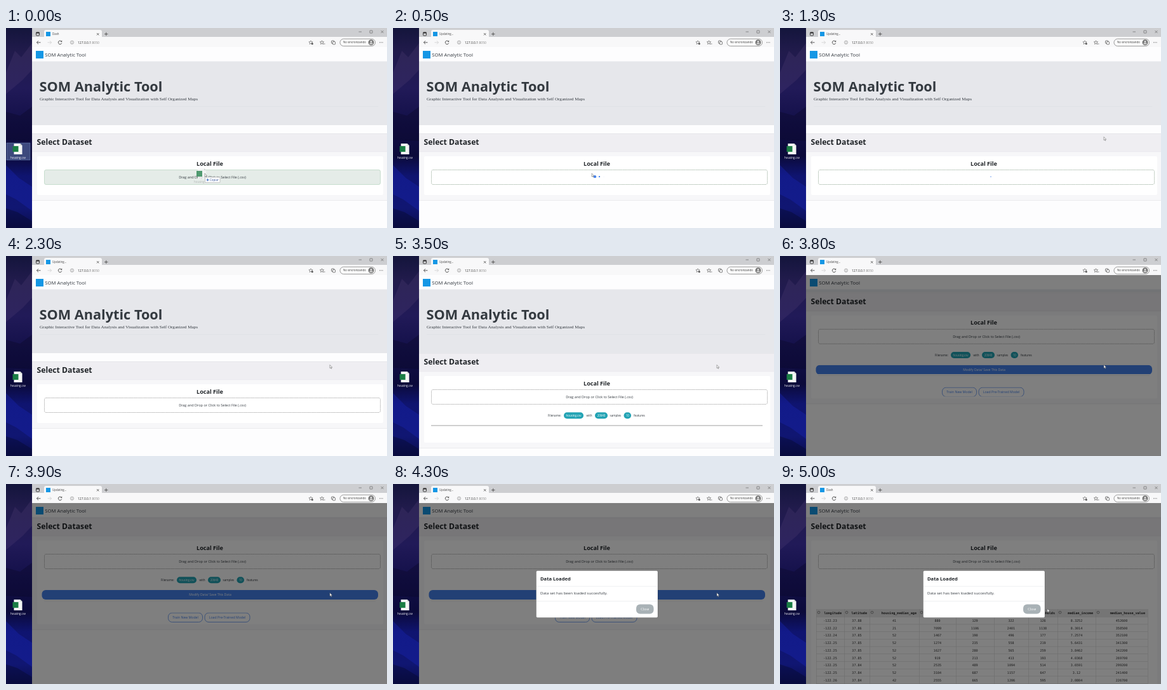
Recreate the animation shown at these times as an HTML page with a canvas. Size 600 by 315 pixels, loop 5.1 s.

```html
<!DOCTYPE html>
<html lang="en">
<head>
<meta charset="utf-8">
<title>SOM Analytic Tool</title>
<style>
html, body { margin: 0; width: 100%; height: 100%; overflow: hidden; background: #fff; }
canvas { display: block; width: 600px; height: 315px; }
</style>
</head>
<body>
<canvas id="stage"></canvas>
<script>
const W = 600, H = 315, LOOP = 5100, STEP = 100;
const SANS = '"Open Sans", "Noto Sans", sans-serif';
const SERIF = '"Liberation Serif", serif';
const MONO = '"DejaVu Sans Mono", monospace';
const INK = '#343a40', PRIMARY = '#4582ec', INFO = '#22a3b4', LOGO = '#1597e5';

const canvas = document.getElementById('stage');
const scale = window.devicePixelRatio || 1;
canvas.width = W * scale;
canvas.height = H * scale;
const ctx = canvas.getContext('2d');

const clamp = v => Math.min(1, Math.max(0, v));
const lerp = (a, b, p) => a + (b - a) * p;

function bezier(x1, y1, x2, y2) {
  const at = (a, b, s) => 3 * a * s * (1 - s) ** 2 + 3 * b * s * s * (1 - s) + s ** 3;
  return x => {
    let lo = 0, hi = 1;
    for (let i = 0; i < 24; i++) {
      const mid = (lo + hi) / 2;
      if (at(x1, x2, mid) < x) lo = mid; else hi = mid;
    }
    return at(y1, y2, (lo + hi) / 2);
  };
}
const ease = bezier(.25, .1, .25, 1);
const easeOut = bezier(0, 0, .58, 1);
const easeInOut = bezier(.42, 0, .58, 1);
const progress = (t, start, length, curve = ease) => {
  const p = clamp((t - start) / length);
  return p === 0 || p === 1 ? p : curve(p);
};

function rect(x, y, w, h, fill) {
  ctx.fillStyle = fill;
  ctx.fillRect(x, y, w, h);
}

function box(x, y, w, h, r, fill, stroke, width = .7) {
  ctx.beginPath();
  ctx.roundRect(x, y, w, h, r);
  if (fill) { ctx.fillStyle = fill; ctx.fill(); }
  if (stroke) { ctx.strokeStyle = stroke; ctx.lineWidth = width; ctx.stroke(); }
}

function disc(x, y, r, fill, stroke, width = .8) {
  ctx.beginPath();
  ctx.arc(x, y, r, 0, Math.PI * 2);
  if (fill) { ctx.fillStyle = fill; ctx.fill(); }
  if (stroke) { ctx.strokeStyle = stroke; ctx.lineWidth = width; ctx.stroke(); }
}

function poly(points, fill) {
  ctx.beginPath();
  points.forEach(([x, y]) => ctx.lineTo(x, y));
  ctx.closePath();
  ctx.fillStyle = fill;
  ctx.fill();
}

function stroke(path, color = '#444', width = .8) {
  ctx.strokeStyle = color;
  ctx.lineWidth = width;
  ctx.stroke(new Path2D(path));
}

function text(str, x, y, size, { color = INK, align = 'left', weight = 400, family = SANS } = {}) {
  ctx.font = `${weight} ${size}px ${family}`;
  ctx.textAlign = align;
  ctx.fillStyle = color;
  ctx.fillText(str, x, y);
}

function clipped(x, y, w, h, draw) {
  if (h <= 0) return;
  ctx.save();
  ctx.beginPath();
  ctx.rect(x, y, w, h);
  ctx.clip();
  draw();
  ctx.restore();
}

function faded(alpha, draw) {
  ctx.save();
  ctx.globalAlpha = alpha;
  draw();
  ctx.restore();
}

function fileIcon(x, y) {
  poly([[x - 6, y - 8], [x + 4, y - 8], [x + 7, y - 5], [x + 7, y + 9], [x - 6, y + 9]], '#f4f6f5');
  poly([[x + 4, y - 8], [x + 7, y - 5], [x + 4, y - 5]], '#c3cac6');
  rect(x - 8, y - 4, 9, 9, '#1b7d45');
}

function desktop(t) {
  const sky = ctx.createLinearGradient(0, 0, 0, H);
  [[0, '#14153c'], [.12, '#211b4c'], [.3, '#211a58'], [.48, '#120f48'],
   [.64, '#0b0a3a'], [.74, '#0f1470'], [.9, '#101672'], [1, '#0a0d4c']].forEach(s => sky.addColorStop(...s));
  rect(0, 0, 41, H, sky);
  poly([[0, 70], [14, 36], [24, 46], [41, 24], [41, 66], [26, 82], [0, 104]], 'rgba(78,62,112,.3)');
  poly([[0, 132], [22, 138], [41, 124], [41, 178], [0, 176]], 'rgba(10,8,42,.4)');
  poly([[0, 216], [20, 236], [41, 250], [41, 288], [16, 270], [0, 262]], 'rgba(24,36,175,.4)');
  poly([[0, 284], [18, 290], [41, 304], [41, 315], [0, 315]], 'rgba(6,8,40,.4)');
  if (t < 300) box(1, 181, 37, 27, 0, 'rgba(120,150,205,.45)', 'rgba(150,180,225,.6)', .6);
  fileIcon(18.5, 190);
  text('housing.csv', 19, 205.5, 4.4, { color: '#fff', align: 'center' });
}

function browser(title) {
  rect(41, 0, 559, 14, '#cdced1');
  box(60, 3, 91, 14, 3, '#f8f8f9');
  rect(41, 14, 559, 16, '#f8f8f9');
  box(47.5, 7, 5, 5, 1, null, '#333', .9);
  rect(47.5, 6.5, 5, 2, '#333');
  rect(63, 6, 7, 7, LOGO);
  text(title, 73, 11.2, 4.4, { color: '#444' });
  stroke('M143 8l3.4 3.4M146.4 8l-3.4 3.4M155 9.5h5.5M157.75 6.8v5.4');
  stroke('M555.5 6h4.5M590.5 4l4 4M594.5 4l-4 4', '#555', .6);
  box(573, 4, 4, 4, .4, null, '#555', .6);
  stroke('M54.5 22.8h-6M51 20.2l-2.6 2.6l2.6 2.6', '#333');
  stroke('M65.5 22.8h6M69 20.2l2.6 2.6l-2.6 2.6', '#cfcfcf');
  stroke('M87.4 21.2a2.8 2.8 0 1 0 .4 2.4M87.8 19.8v1.8h-1.8', '#333');
  disc(104, 22.7, 2.6, null, '#777', .6);
  stroke('M104 22.3v2M104 21v.6', '#777', .6);
  text('127.0.0.1', 113, 24.7, 5, { color: '#333' });
  const hostWidth = ctx.measureText('127.0.0.1').width;
  text(':8050', 113 + hostWidth, 24.7, 5, { color: '#888' });
  stroke('M480 19.8l1 2h2.1l-1.7 1.5l.5 2.2l-1.9-1.2l-1.9 1.2l.5-2.2l-1.7-1.5h2.1z', '#555', .6);
  disc(482.3, 24.7, 1.5, '#555');
  stroke('M497.5 19.8l1 2h2.1l-1.7 1.5l.5 2.2l-1.9-1.2l-1.9 1.2l.5-2.2l-1.7-1.5h2.1zM500 25h2.5', '#444', .6);
  box(512.5, 20, 4.4, 4.4, 1, null, '#444');
  box(514.4, 21.6, 4.2, 4.2, 1, '#f8f8f9', '#444');
  box(526, 17.2, 55.5, 11.2, 5.6, '#fff', '#555', .6);
  text('No sincronizando', 531, 24.4, 4.4, { color: '#333' });
  disc(575, 22.8, 4.5, '#777');
  disc(575, 21.4, 1.5, '#ddd');
  rect(572.6, 23.6, 4.8, 1.9, '#ddd');
  [588.6, 590.8, 593].forEach(x => disc(x, 22.8, .55, '#333'));
}

function hero(bottom) {
  clipped(41, 53, 559, bottom - 53, () => {
    rect(41, 53, 559, 100, '#e6e7eb');
    text('SOM Analytic Tool', 52.5, 100, 21.7, { weight: 700 });
    text('Graphic Interactive Tool for Data Analysis and Visualization with Self Organized Maps',
      53, 113.5, 7.1, { family: SERIF });
    rect(53, 123.5, 533, .6, '#dcdde1');
  });
}

function spinner(t, y) {
  // Three bouncing dots, each trailing the one to its left.
  [318, 325, 332].forEach((x, i) => {
    const phase = ((t - 1300 - (i - 2) * 160) / 1400 + .65 + 2) % 1;
    const size = phase < .4 ? easeInOut(phase / .4) : phase < .8 ? 1 - easeInOut((phase - .4) / .4) : 0;
    disc(x, y, 2.4 * size, PRIMARY);
  });
}

function dropZone(t, top) {
  const dragging = t < 300, loading = !dragging && t < 2000;
  if (dragging) {
    box(60.5, top, 529, 23, 2.5, '#e5ece8', '#b5d3be');
  } else {
    ctx.setLineDash([1.4, .9]);
    box(60.5, top, 529, 23, 2.5, '#fff', loading ? '#809a83' : '#888');
    ctx.setLineDash([]);
  }
  if (loading) spinner(t, top + 10.7);
  else text('Drag and Drop or Click to Select File (.csv)', 325, top + 13.9, 5.52, { align: 'center' });
}

function summary(top) {
  const pill = (label, x, w) => {
    box(x, top - 5, w, 10, 5, INFO);
    text(label, x + w / 2, top + 1.6, 4.4, { color: '#fff', align: 'center' });
  };
  [['Filename:', 244], ['with', 304.5], ['samples', 341.5], ['features', 379]]
    .forEach(([label, x]) => text(label, x, top + 1.6, 4.6));
  pill('housing.csv', 269, 31);
  pill('20640', 318, 20);
  pill('10', 363.5, 11.5);
}

function buttons(base, p) {
  clipped(41, base + 114, 559, 15 * p, () => {
    box(56.5, base + 114, 529.5, 15, 6, PRIMARY);
    text('Modify Data/ Save This Data', 321.5, base + 123.4, 5.1, { color: '#fff', align: 'center' });
  });
  const top = base + 135 + 15 * p;
  clipped(41, top - .5, 559, 15.5 * p, () => {
    [['Train New Model', 255.5, 54], ['Load Pre-Trained Model', 313, 71]].forEach(([label, x, w]) => {
      box(x, top, w, 14.5, 6, null, PRIMARY);
      text(label, x + w / 2, top + 9.2, 5.2, { color: PRIMARY, align: 'center' });
    });
  });
}

const COLUMNS = [['longitude', 57], ['latitude', 101], ['housing_median_age', 141], ['total_rooms', 219],
  ['total_bedrooms', 277], ['population', 337], ['households', 391], ['median_income', 437], ['median_house_value', 497]];
const ROWS = `-122.23 37.88 41 880 129 322 126 8.3252 452600
-122.22 37.86 21 7099 1106 2401 1138 8.3014 358500
-122.24 37.85 52 1467 190 496 177 7.2574 352100
-122.25 37.85 52 1274 235 558 219 5.6431 341300
-122.25 37.85 52 1627 280 565 259 3.8462 342200
-122.25 37.85 52 919 213 413 193 4.0368 269700
-122.25 37.84 52 2535 489 1094 514 3.6591 299200
-122.25 37.84 52 3104 687 1157 647 3.12 241400
-122.26 37.84 42 2555 665 1206 595 2.0804 226700`.split('\n').map(row => row.split(' '));

function table(top) {
  const pitch = 11.7, right = 579;
  rect(57, top, right - 57, 12, '#ececec');
  COLUMNS.forEach(([name, x], c) => {
    const end = c + 1 < COLUMNS.length ? COLUMNS[c + 1][1] : right;
    disc(x + 4, top + 5.2, 1.9, null, '#555', .6);
    clipped(x, top, end - x, 12, () =>
      text(name, end - 4, top + 8, 5.1, { align: 'right', weight: 700, family: MONO, color: '#222' }));
    ROWS.forEach((row, r) =>
      text(row[c], (x + end) / 2, top + 20 + r * pitch, 5.1, { align: 'center', family: MONO, color: '#333' }));
    rect(x, top, .5, H - top, '#d3d3d3');
  });
  rect(right, top, .5, H - top, '#d3d3d3');
  for (let r = 0; r <= ROWS.length; r++) rect(57, top + 12 + r * pitch, right - 57, .5, '#d3d3d3');
}

function page(t) {
  const info = progress(t, 3050, 350);
  const folded = progress(t, 3546, 350);
  const loaded = t >= 4400;
  const base = t < 3500 ? 166 : 153 - 100 * folded;
  const cardEnd = loaded ? H + 5 : base + 97 + 44 * info + 27 * folded;

  rect(41, 30, 559, 285, '#fdfdfe');
  rect(47, 36, 12, 12, LOGO);
  text('SOM Analytic Tool', 61.3, 45, 7.75);
  rect(41, 52.5, 559, .5, '#e6e7ea');
  hero(Math.min(153, base));

  rect(41, base, 559, cardEnd + 8 - base, '#f7f7f9');
  rect(41, base, 559, 29, '#efeef2');
  rect(41, base, 559, .6, '#e2e2e6');
  rect(41, base + 28.6, 559, .6, '#e4e4e8');
  rect(41, cardEnd + 8, 559, .6, '#dfdfe3');
  text('Select Dataset', 48.5, base + 18.4, 12.2, { weight: 700, color: '#212529' });
  box(49, base + 36, 545, cardEnd - base - 36, 2, '#fff');
  text('Local File', 321, base + 50.5, 9.1, { weight: 700, align: 'center', color: '#212529' });
  dropZone(t, base + 57.5);

  clipped(41, base + 88, 559, 44 * info, () => {
    summary(base + 98.2);
    if (!loaded) rect(60, base + 113.6 + 17 * folded, 522, .9, `rgba(0,0,0,${.42 - .34 * folded})`);
  });
  if (loaded) table(base + 144);
  else buttons(base, folded);
}

function modal(t) {
  const shade = .5 * clamp((t - 3646) / 150);
  if (shade) rect(41, 30, 559, 285, `rgba(0,0,0,${shade})`);
  const alpha = clamp((t - 3950) / 150);
  if (!alpha) return;
  faded(alpha, () => {
    ctx.translate(0, -25 * (1 - progress(t, 3950, 300, easeOut)));
    box(225.5, 136.5, 191.5, 74, 2, '#fff', 'rgba(0,0,0,.3)', .6);
    rect(226, 160.8, 191, .6, '#e3e5e8');
    rect(226, 184, 191, .6, '#e3e5e8');
    text('Data Loaded', 232, 151.7, 7.6, { weight: 700, color: '#212529' });
    text('Data set has been loaded succesfully.', 232, 174.4, 6.1);
    box(383, 189.5, 27.5, 15, 6, '#a9b2b6');
    text('Close', 396.7, 199, 5.7, { family: SERIF, color: '#fff', align: 'center' });
  });
}

function pointer(t) {
  const out = progress(t, 600, 500, easeInOut);
  const back = progress(t, 4700, 300, easeInOut);
  const x = lerp(lerp(313, 510, out), 421, back);
  const y = lerp(lerp(229, 171.5, out), 196.5, back);
  const arrow = new Path2D(`M${x} ${y}v5.2l1.2-1.1l.9 1.9l.9-.4l-.9-1.8h1.6z`);
  ctx.fillStyle = '#fff';
  ctx.fill(arrow);
  ctx.strokeStyle = '#555';
  ctx.lineWidth = .5;
  ctx.stroke(arrow);
}

function dragGhost() {
  faded(.75, () => fileIcon(308, 229));
  faded(.4, () => text('housing.csv', 308, 244, 4.4, { align: 'center', color: '#666' }));
  pointer(0);
  box(313.5, 235, 23.5, 8.4, .5, '#fff', '#aaa', .6);
  stroke('M315.6 239.2h4M317.6 237.2v4', '#2358b8', .9);
  text('Copiar', 321, 240.9, 4.5, { color: '#36549a' });
}

function draw(t) {
  ctx.setTransform(scale, 0, 0, scale, 0, 0);
  ctx.textBaseline = 'alphabetic';
  desktop(t);
  browser(t >= 300 && t < 4400 ? 'Updating...' : 'Dash');
  clipped(41, 30, 559, 285, () => {
    page(t);
    modal(t);
  });
  if (t < 300) dragGhost();
  else pointer(t);
}

const start = performance.now();
function tick() {
  const t = (performance.now() - start) % LOOP;
  draw(Math.floor(t / STEP) * STEP);
  requestAnimationFrame(tick);
}
tick();
</script>
</body>
</html>
```
